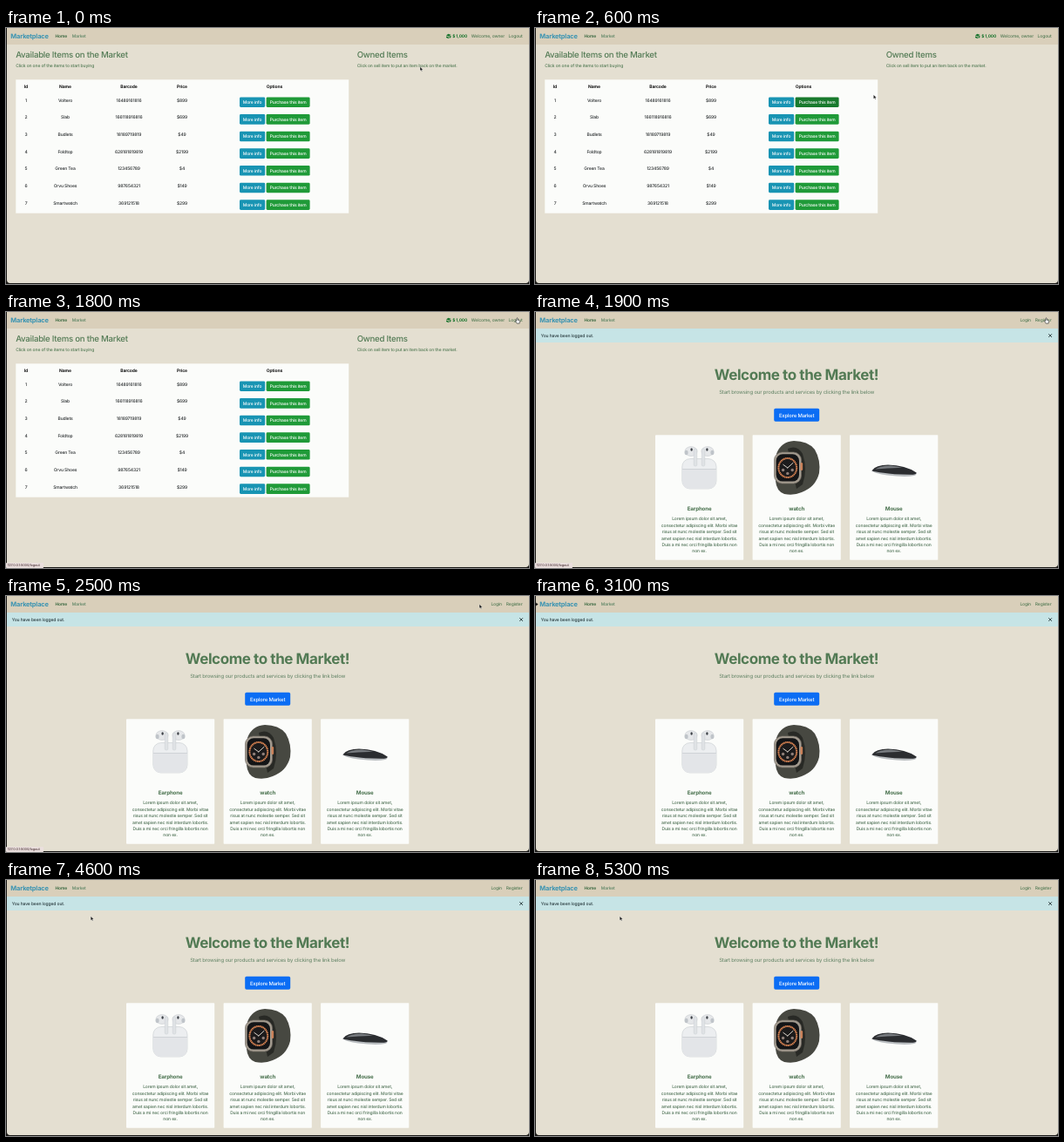
Animation of 600x294 px, one loop 5.4 s. Source, as an HTML page:

```html
<!DOCTYPE html>
<html lang="en">
<head>
<meta charset="utf-8">
<title>Marketplace</title>
<style>
  html, body { margin: 0; width: 100%; height: 100%; overflow: hidden; background: #e4dfd1; }
  svg { display: block; width: 600px; height: 294px; }
  text {
    font-family: Inter, "Open Sans", sans-serif;
    letter-spacing: -.025em;
    text-rendering: geometricPrecision;
    white-space: pre;
  }
</style>
</head>
<body>
<svg id="stage" viewBox="0 0 600 294"></svg>
<script>
const LOOP = 5400, STEP = 100;
const GREEN = '#527a54', INK = '#24282a', CARD = '#fbfcfa';

const text = (x, y, str, { size = 5, fill = INK, weight = 500, anchor = 'start' } = {}) =>
  `<text x="${x}" y="${y}" font-size="${size}" font-weight="${weight}" fill="${fill}" text-anchor="${anchor}">${str}</text>`;
const mid = (x, y, str, opt) => text(x, y, str, { anchor: 'middle', ...opt });
const end = (x, y, str, opt) => text(x, y, str, { anchor: 'end', ...opt });
const rect = (x, y, w, h, fill, r = 0, extra = '') =>
  `<rect x="${x}" y="${y}" width="${w}" height="${h}" rx="${r}" fill="${fill}" ${extra}/>`;
const path = (d, fill, extra = '') => `<path d="${d}" fill="${fill}" ${extra}/>`;
const line = (d, stroke, width) =>
  path(d, 'none', `stroke="${stroke}" stroke-width="${width}" stroke-linecap="round" stroke-linejoin="round"`);
const oval = (x, y, rx, ry, fill, extra = '') =>
  `<ellipse cx="${x}" cy="${y}" rx="${rx}" ry="${ry}" fill="${fill}" ${extra}/>`;

const navbar = () =>
  rect(0, 0, 600, 19, '#d9cfba') +
  text(5.3, 11.9, 'Marketplace', { size: 7.45, weight: 700, fill: '#3b94b2' }) +
  text(56.5, 11.1, 'Home', { weight: 600, fill: '#2f6238', size: 4.9 }) +
  text(75.8, 11.1, 'Market', { fill: '#568160', size: 4.9 });

// Market page
const goods = [
  ['Voltero', '16489161816', '$899'],
  ['Slab', '166118916816', '$699'],
  ['Budlets', '18189719819', '$49'],
  ['Foldtop', '628181819819', '$2199'],
  ['Green Tea', '123456789', '$4'],
  ['Orvu Shoes', '987654321', '$149'],
  ['Smartwatch', '369121518', '$299']
];
const columns = [23, 68, 141, 202, 308];

function row(item, i) {
  const y = 83 + i * 19.65;
  const white = { fill: '#fff' };
  return [i + 1, ...item].map((v, c) => mid(columns[c], y + 1.8, v)).join('') +
    rect(268, y - 3.6, 29.2, 11.6, '#1894b3', 1.4) +
    mid(282.6, y + 4, 'More info', white) +
    rect(298.6, y - 3.6, 50, 11.6, '#1f9a38', 1.4, i ? '' : 'id="buy"') +
    mid(323.6, y + 4, 'Purchase this item', white);
}

const market = () =>
  path('M505 8.6l2.4-1.8 3 1-2.4 2z M505 9.4l2.8 1.2v1.6L505 11z M508.6 10l1.8-1.4v2.2l-1.8 1.2z', '#16732c') +
  end(529.2, 11.1, '$ 1,000', { weight: 700, fill: '#16732c', size: 4.9 }) +
  end(572, 11.1, 'Welcome, owner', { fill: GREEN }) +
  end(592.5, 11.1, 'Logout', { fill: GREEN }) +
  text(11.2, 34.4, 'Available Items on the Market', { size: 9.65, fill: GREEN }) +
  text(402.7, 34.4, 'Owned Items', { size: 9.65, fill: GREEN }) +
  text(11.2, 45.1, 'Click on one of the items to start buying', { fill: GREEN }) +
  text(402.7, 45.1, 'Click on sell item to put an item back on the market.', { fill: GREEN, size: 4.95 }) +
  rect(11.3, 59.3, 381.9, 153.4, CARD) +
  ['Id', 'Name', 'Barcode', 'Price', 'Options']
    .map((h, c) => mid(columns[c], 69.1, h, { weight: 700, fill: '#111' })).join('') +
  goods.map(row).join('');

// Welcome page
const lorem = [
  'Lorem ipsum dolor sit amet,',
  'consectetur adipiscing elit. Morbi vitae',
  'risus at nunc molestie semper. Sed sit',
  'amet sapien nec nisl interdum lobortis.',
  'Duis a mi nec orci fringilla lobortis non',
  'non ex.'
];

const bud = (x, dir) =>
  oval(x, 160, 7, 5.4, '#e6e8ea', 'stroke="#c6cacf" stroke-width=".6"') +
  oval(x - dir * 5.4, 161.5, 2, 2.8, '#bfc4c9') +
  oval(x + dir * .6, 158, 1.2, 1.8, '#3c4046') +
  rect(x + dir * 5 - 1.8, 157, 3.6, 20, '#dfe2e5', 1.7, 'stroke="#c3c7cc" stroke-width=".4"');

const earphone = () =>
  rect(168.8, 168.6, 39.2, 34.4, '#eceef0', 9, 'stroke="#cdd1d5" stroke-width=".7"') +
  bud(179, 1) + bud(198, -1) +
  path('M169 180.5H207.8V193q0 10-9 10H178q-9 0-9-10z', '#e3e5e8') +
  line('M169.5 180.5H207.5', '#c6cacf', .7);

const watch = () =>
  path('M277 163Q282 149 297 148Q313 148 321 158Q328 170 326 185Q322 201 306 207Q297 211 286 209Q277 206 276 194Z', '#474841') +
  path('M290 157Q301 152 307 163Q313 180 307 198L300 203Z', '#282925') +
  rect(274.5, 161, 31, 36, '#a39b8f', 9, 'stroke="#716b64" stroke-width=".7"') +
  rect(304.5, 173, 2.6, 9, '#c98058', 1.2) +
  rect(276.6, 163.2, 26.4, 31.4, '#141517', 7.5) +
  oval(289.8, 179, 10.4, 11, '#1c1b1c', 'stroke="#e58a56" stroke-width="2" stroke-dasharray="1.4 .5"') +
  line('M289.8 179L284.8 175.3M289.8 179L296 173.3', '#eee6dc', .9) +
  [[284.6, 181.5], [289.8, 185.4], [295.2, 181.5]].map(([x, y]) => oval(x, y, 1.7, 1.7, '#90807a')).join('');

const mouse = () =>
  path('M386.3 182.6Q390 185.5 404 187.6Q425 190 435 188Q438 187 437.6 184.5L400 179Z', '#b9bdc0') +
  path('M386.3 182.2Q391 175.6 405 175.6Q425 176.2 437.6 184.4Q438 186.8 430 186.7Q410 186.6 400 184.8Q390 183.6 386.3 182.2Z', '#2b2d30') +
  path('M390.5 180.6Q396 176.6 408 176.6Q416 177.2 421 179Q408 178.6 390.5 180.6Z', '#777b7f');

const card = (x, name, art) =>
  rect(x - 50.6, 141.2, 101.2, 143.5, CARD, .8) + art() +
  mid(x, 228.3, name, { size: 6.2, weight: 700, fill: '#47704c' }) +
  lorem.map((s, i) => mid(x, 239.3 + i * 7.42, s, { fill: '#4c6f53' })).join('');

const welcome = () =>
  end(569, 11.1, 'Login', { fill: GREEN }) +
  end(592.5, 11.1, 'Register', { fill: GREEN }) +
  rect(0, 19, 600, 16, '#c6e4e6') +
  text(6.8, 28.5, 'You have been logged out.', { fill: '#26373b' }) +
  line('M589.5 25.5l3.2 3.2m0-3.2l-3.2 3.2', '#27383a', .9) +
  mid(300, 77.6, 'Welcome to the Market!', { size: 17, weight: 700, fill: GREEN }) +
  mid(300.2, 93.5, 'Start browsing our products and services by clicking the link below',
    { size: 5.95, weight: 400, fill: '#5f8163' }) +
  rect(274.2, 110.7, 52, 15.1, '#0b6df4', 1.8) +
  mid(300.1, 120.7, 'Explore Market', { size: 5.9, fill: '#fff' }) +
  card(188.6, 'Earphone', earphone) +
  card(300.2, 'watch', watch) +
  card(411.7, 'Mouse', mouse);

const status = () =>
  rect(0, 288, 43, 6, '#eadfdd', .8) +
  text(1.8, 292.4, '127.0.0.1:5000/logout', { size: 3.85, fill: '#4c3438' });

const frame = () =>
  path('M0 0H600V294H0Z M1 0V289.3q0 3.7 3.7 3.7H596.3q3.7 0 3.7-3.7V0Z', '#1b1a18', 'fill-rule="evenodd"');

const arrow = path('M0 0V4.6L1.1 3.7L1.9 5.3L2.7 4.9L2 3.4H3.4Z', '#111', 'stroke="#fff" stroke-width=".35"');
const hand = path('M-.6 -2.4q.6-.7 1.2 0V-.4l2 .5q.7.3.5 1.2l-.5 2.3h-3L-2.2.9q0-.9 1.6-.1Z', '#fff', 'stroke="#222" stroke-width=".6"');
const resize = path('M0-.6H1.2V-2L3.6 0L1.2 2V.6H0Z', '#111');

const group = (id, body) => `<g id="${id}">${body}</g>`;
const $ = id => document.getElementById(id);

$('stage').innerHTML =
  rect(0, 0, 600, 294, '#e4dfd1') + navbar() +
  group('market', market()) + group('welcome', welcome()) +
  frame() + group('status', status()) +
  group('cursor', group('arrow', arrow) + group('hand', hand) + group('resize', resize));

// Pointer stops: time, x, y
const stops = [
  [0, 475, 44.5], [300, 345, 85], [500, 346, 85], [800, 509.3, 53],
  [1200, 586.5, 9.5], [2400, 586.5, 9.5], [3000, 0, 9.5],
  [3100, 0, 9.5], [3700, 97.2, 41.7], [LOOP, 97.2, 41.7]
];

function pointer(t) {
  const i = stops.findIndex(s => s[0] > t);
  const [t0, x0, y0] = stops[i - 1], [t1, x1, y1] = stops[i];
  const k = (t - t0) / (t1 - t0), e = k * k * (3 - 2 * k);
  return [x0 + (x1 - x0) * e, y0 + (y1 - y0) * e];
}

const within = (t, a, b) => t >= a && t < b;
const show = (id, on) => $(id).setAttribute('visibility', on ? 'visible' : 'hidden');

function draw(now) {
  const t = Math.floor((now % LOOP) / STEP) * STEP;
  const linked = within(t, 300, 600) || within(t, 1200, 2500);
  const atEdge = within(t, 3000, 3200);
  show('market', t < 1900);
  show('welcome', t >= 1900);
  show('status', within(t, 1300, 2700));
  show('hand', linked);
  show('resize', atEdge);
  show('arrow', !linked && !atEdge);
  $('buy').setAttribute('fill', within(t, 300, 900) ? '#187a2d' : '#1f9a38');
  $('cursor').setAttribute('transform', `translate(${pointer(t).map(v => v.toFixed(2))})`);
}

const start = performance.now();
function tick() {
  draw(performance.now() - start);
  requestAnimationFrame(tick);
}
tick();
</script>
</body>
</html>
```
